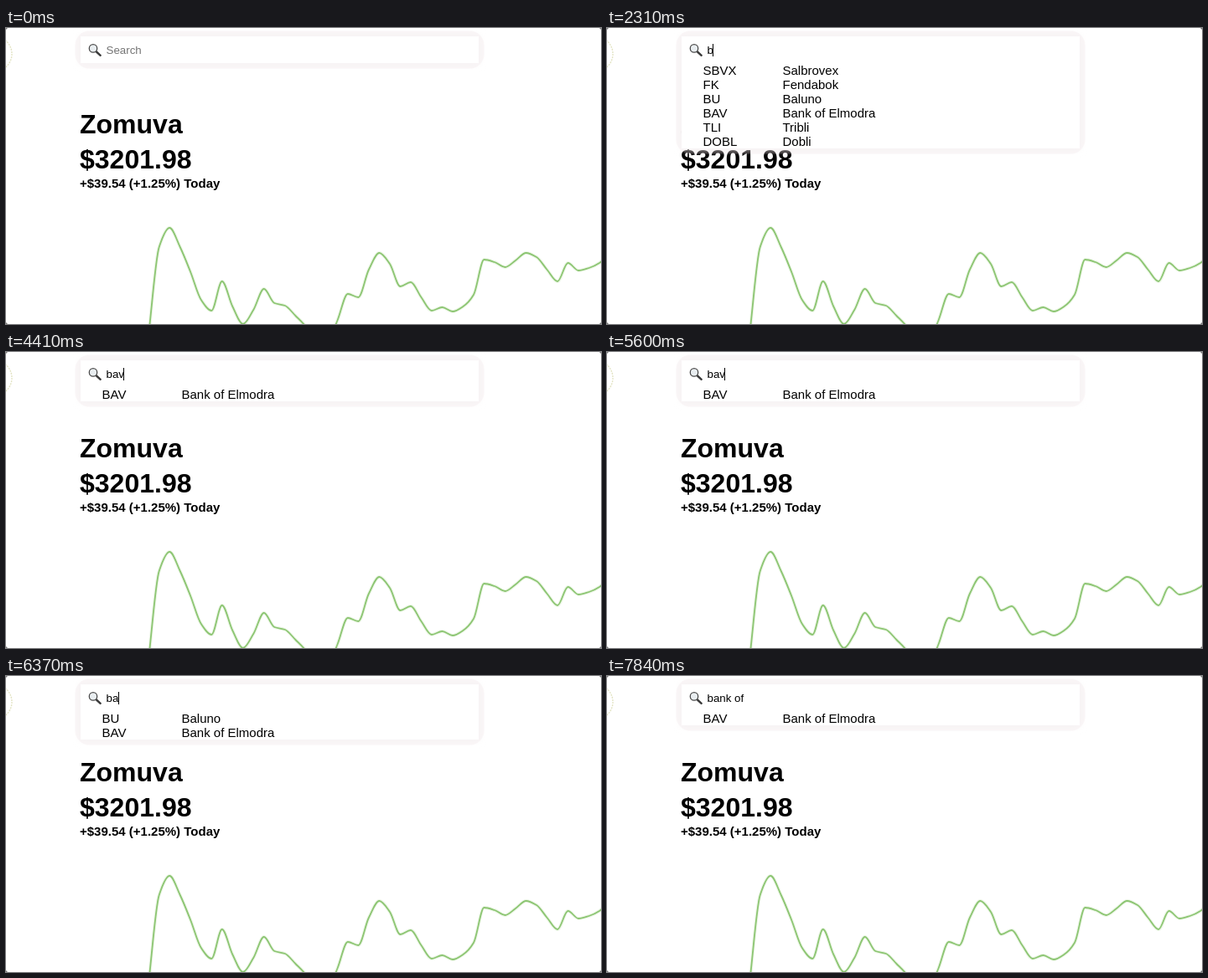
These frames come from a looping animation (710x354 px, 8000 ms). An HTML page:

```html
<!DOCTYPE html>
<html lang="en">
<head>
<meta charset="utf-8">
<title>Stock search</title>
<style>
html, body { margin: 0; width: 100%; height: 100%; overflow: hidden; background: #fff; }
svg { display: block; width: 710px; height: 354px; font-family: "Liberation Sans", Arial, sans-serif; }
text { white-space: pre; }
.big { font-size: 32px; font-weight: bold; }
.note { font-size: 15px; font-weight: bold; }
.row { font-size: 15px; }
.field { font-size: 13.333px; }
</style>
</head>
<body>
<svg viewBox="0 0 710 354">
  <defs>
    <filter id="soft" filterUnits="userSpaceOnUse" x="60" y="-20" width="540" height="200">
      <feGaussianBlur stdDeviation="5"/>
    </filter>
  </defs>
  <rect width="710" height="354" fill="#fff"/>
  <circle cx="-14" cy="31" r="21" fill="none" stroke="#e3e4c4" stroke-width="1.4" stroke-dasharray="2 1.2"/>
  <text class="big" x="88" y="126">Zomuva</text>
  <text class="big" x="88" y="168">$3201.98</text>
  <text class="note" x="88" y="191">+$39.54 (+1.25%) Today</text>
  <g fill="none" stroke-linejoin="round">
    <path class="line" stroke="#dff0d6" stroke-width="4" opacity=".6"/>
    <path class="line" stroke="#8cc572" stroke-width="1.8"/>
  </g>
  <rect class="panel" data-grow="6.5" rx="17" fill="#e1cdd2" opacity=".19"/>
  <rect class="panel" data-grow="0" fill="#f4f1f2" filter="url(#soft)"/>
  <rect class="panel" data-grow="0" fill="#fff"/>
  <rect id="hover" x="89" width="475" height="17" fill="#edf5fa"/>
  <g id="rows"></g>
  <g>
    <path d="M108 28.5L112.7 32.8" stroke="#3a3a3a" stroke-width="2.4" stroke-linecap="round"/>
    <circle cx="104" cy="24.4" r="4.7" fill="#e9eef1" stroke="#4c4c4c" stroke-width="1.3"/>
  </g>
  <text class="field" id="hint" x="119.5" y="31" fill="#757575">Search</text>
  <text class="field" id="typed" x="119.5" y="31"></text>
  <rect id="caret" y="19" width="1" height="15"/>
  <path d="M0 0h2L0 2zM710 0h-2l2 2zM0 354v-2l2 2zM710 354v-2l-2 2z" fill="#777"/>
</svg>
<script>
const LOOP = 8000, BLINK = 560, ROW = 17, TOP = 42;
const $ = s => document.querySelector(s);
const all = s => [...document.querySelectorAll(s)];

const stocks = [
  ["SBVX", "Salbrovex"], ["FK", "Fendabok"], ["BU", "Baluno"],
  ["BAV", "Bank of Elmodra"], ["TLI", "Tribli"], ["DOBL", "Dobli"]
];
const typing = [
  [0, ""], [2240, "b"], [4130, "ba"], [4410, "bav"], [5810, "ba"], [6020, "b"],
  [6300, "ba"], [6510, "ban"], [6650, "bank"], [6790, "bank "], [7000, "bank o"], [7070, "bank of"]
];
// hovered row index, -1 for none
const hovering = [[0, -1], [3220, 5], [3290, 4], [3360, 3], [4130, -1]];

const prices = [
  366, 262, 239, 262, 292, 325, 338, 303, 333, 354, 337, 312, 329, 332, 344, 357, 375, 376,
  350, 318, 322, 289, 269, 282, 309, 304, 322, 338, 334, 339, 333, 319, 277, 280, 286, 278,
  269, 274, 289, 303, 281, 290, 287, 281, 268
];

// monotone cubic through evenly spaced points
function monotone(ys, x0, dx) {
  const d = ys.slice(1).map((y, i) => y - ys[i]);
  const slope = ys.map((_, i) => {
    const a = d[i - 1] ?? d[i], b = d[i] ?? a;
    return a * b > 0 ? 2 * a * b / (a + b) : 0;
  });
  let path = `M${x0} ${ys[0]}`;
  for (let i = 1; i < ys.length; i++) {
    const x = x0 + dx * i;
    path += `C${x - dx * 2 / 3} ${ys[i - 1] + slope[i - 1] / 3} ${x - dx / 3} ${ys[i] - slope[i] / 3} ${x} ${ys[i]}`;
  }
  return path;
}

const latest = (list, t) => list.filter(e => e[0] <= t).pop();
const show = (el, on) => el.setAttribute("visibility", on ? "visible" : "hidden");

const panels = all(".panel"), rows = $("#rows"), hover = $("#hover");
const hint = $("#hint"), typed = $("#typed"), caret = $("#caret");
let shown = null;

function setQuery(query) {
  const hits = query
    ? stocks.filter(s => s.some(word => word.toLowerCase().includes(query)))
    : [];
  rows.innerHTML = hits.map(([symbol, name], i) => {
    const y = TOP + ROW * i + 14;
    return `<text class="row" x="114.5" y="${y}">${symbol}</text><text class="row" x="209.5" y="${y}">${name}</text>`;
  }).join("");
  for (const p of panels) {
    const g = +p.dataset.grow;
    p.setAttribute("x", 89 - g);
    p.setAttribute("y", 10 - g);
    p.setAttribute("width", 475 + 2 * g);
    p.setAttribute("height", TOP - 10 + ROW * hits.length + 2 * g);
  }
  typed.textContent = query;
  show(hint, !query);
  caret.setAttribute("x", Math.floor(119.3 + (query ? typed.getComputedTextLength() : 0)));
  shown = query;
}

function draw(t) {
  const [since, query] = latest(typing, t);
  if (query !== shown) setQuery(query);
  show(caret, t >= 70 && (t - since) % (2 * BLINK) < BLINK);
  const row = latest(hovering, t)[1];
  show(hover, row >= 0);
  hover.setAttribute("y", TOP + ROW * row);
}

all(".line").forEach(p => p.setAttribute("d", monotone(prices, 170.2, 12.51)));

const start = performance.now();
function tick() {
  draw((performance.now() - start) % LOOP);
  requestAnimationFrame(tick);
}
tick();
</script>
</body>
</html>
```
